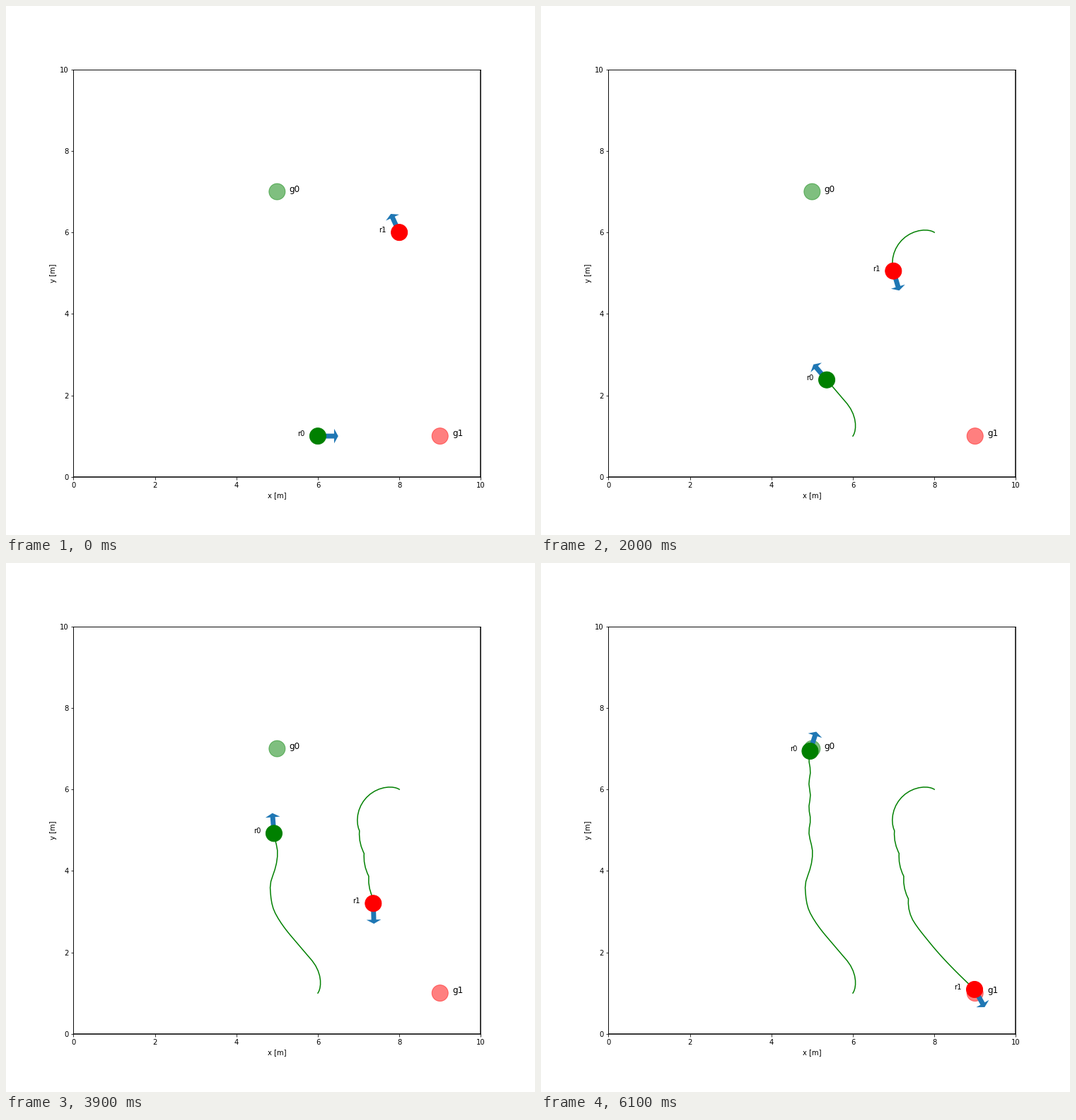
A matplotlib script that plays this animation: 748 by 748 pixels, repeating every 8000 ms.

```python
import numpy as np
import matplotlib.pyplot as plt
from matplotlib.animation import FuncAnimation
from matplotlib.patches import Circle, Polygon

SIZE, DPI = 748, 72
STEP_MS, LAST_STEP, FRAMES = 100, 61, 80
PACE = 0.15  # metres per step, and radians per step when turning
RADIUS, ARROW_LEN, ARROW_WIDTH = 0.2, 0.5, 0.6

# A route is a list of keys: (step, x, y, heading in radians)


def launch(x, y, heading, delay, steps, top=1.0, final=np.inf):
    """Turn left at a steady rate, gaining speed once the delay is over."""
    mid = np.arange(steps) + 0.5
    angle = np.minimum(heading + PACE * mid, final)
    speed = PACE * np.clip(np.sin(PACE * (mid - delay)), 0, top)
    xs = x + np.cumsum(speed * np.cos(angle))
    ys = y + np.cumsum(speed * np.sin(angle))
    turn = np.minimum(heading + PACE * np.arange(1, steps + 1), final)
    return [(0, x, y, heading), *zip(range(1, steps + 1), xs, ys, turn)]


def sway(first, last, y0, y1):
    """Drive straight up with a slight weave."""
    t = np.arange(first, last + 1)
    rate, size = 2 * np.pi / 4.4, 0.018
    phase = rate * (t - 44.8)
    rise = (y1 - y0) / (last - first)
    angle = np.pi / 2 - np.arctan(size * rate * np.cos(phase) / rise)
    return list(zip(t, 4.94 + size * np.sin(phase), y0 + rise * (t - first), angle))


def hooks(start, end, count, pause=1.4):
    """Equal left-hand arcs, each begun by a halt and a swing back."""
    marks = np.linspace(start, end, count + 1)
    keys = []
    for a, b in zip(marks, marks[1:]):
        keys += [(a[0] + pause, a[1], a[2], 4.62), (*b, 5.2)]
    return keys + [(end[0] + pause, end[1], end[2], 4.62)]


def turn_right(key, steps):
    t, x, y, heading = key
    return (t + steps, x, y, heading - PACE * steps)


def follow(route):
    """Positions and headings at whole steps, on curves tangent to the headings."""
    t, x, y, angle = np.array(route, float).T
    pos = np.column_stack([x, y])
    facing = np.column_stack([np.cos(angle), np.sin(angle)])
    steps = np.arange(LAST_STEP + 1)
    k = np.clip(np.searchsorted(t, steps, "right") - 1, 0, len(t) - 2)
    u = np.minimum((steps - t[k]) / (t[k + 1] - t[k]), 1)[:, None]
    move = pos[k + 1] - pos[k]
    chord = np.hypot(*move.T)[:, None]
    points = (pos[k] + (3 * u**2 - 2 * u**3) * move
              + (u**3 - 2 * u**2 + u) * chord * facing[k]
              + (u**3 - u**2) * chord * facing[k + 1])
    return points, np.interp(steps, t, angle)


def route_up():
    route = launch(6, 1, 0, delay=5.5, steps=16, final=2.28)
    route += [(20, 5.36, 2.38, 2.28), (25, 4.955, 2.96, 2.05),
              (30, 4.83, 3.59, 1.62), (32.6, 4.925, 3.97, 1.24),
              (35.7, 5.01, 4.46, 1.59)]
    route += sway(39, 54, 4.92, 6.94)
    return route + [turn_right(route[-1], 1)]


def route_down():
    route = launch(8, 6, 2, delay=2.9, steps=21, top=0.82)
    route += hooks(route[-1][:3], (36.8, 7.364, 3.311), 3)
    route += [(42.5, 7.5, 2.745, 5.28), (47, 7.876, 2.252, 5.39),
              (59, 8.988, 1.089, 5.53)]
    return route + [turn_right(route[-1], 2)]


def arrow_shape(center, angle):
    along = np.array([0, 0, 0.8, 0.8, 1, 0.8, 0.8]) * ARROW_LEN
    across = np.array([0.1, -0.1, -0.1, -0.3, 0, 0.3, 0.1]) * ARROW_WIDTH
    c, s = np.cos(angle), np.sin(angle)
    return center + np.column_stack([along * c - across * s,
                                     along * s + across * c])


class Robot:
    def __init__(self, ax, index, route, goal, color):
        self.points, self.angles = follow(route)
        ax.add_patch(Circle(goal, RADIUS, color=color, alpha=0.5, zorder=1))
        ax.text(goal[0] + 0.3, goal[1], f"g{index}", fontsize=12, zorder=3)
        start = self.points[0]
        self.arrow = ax.add_patch(Polygon(
            arrow_shape(start, self.angles[0]), facecolor="C0", lw=0, zorder=1.2))
        self.trail, = ax.plot([], [], "g-", zorder=2)
        self.body = ax.add_patch(Circle(start, RADIUS, color=color, zorder=2.2))
        self.label = ax.text(*start, f"r{index}", fontsize=10, zorder=3)

    def show(self, step):
        here = self.points[step]
        self.body.center = here
        self.arrow.set_xy(arrow_shape(here, self.angles[step]))
        self.label.set_position((here[0] - 0.5, here[1]))
        self.trail.set_data(*self.points[:step + 1].T)
        return [self.arrow, self.trail, self.body, self.label]


fig, ax = plt.subplots(figsize=(SIZE / DPI, SIZE / DPI), dpi=DPI)
ax.plot([0, 10, 10, 0, 0], [0, 0, 10, 10, 0], "k-")
ax.set_aspect("equal")
ax.set_xlim(0, 10)
ax.set_ylim(0, 10)
ax.set_xlabel("x [m]")
ax.set_ylabel("y [m]")

robots = [Robot(ax, 0, route_up(), (5, 7), "g"),
          Robot(ax, 1, route_down(), (9, 1), "r")]


def update(frame):
    step = min(frame, LAST_STEP)
    return [artist for robot in robots for artist in robot.show(step)]


anim = FuncAnimation(fig, update, frames=FRAMES, init_func=lambda: update(0),
                     interval=STEP_MS, repeat=True, repeat_delay=0)
plt.show()
```
